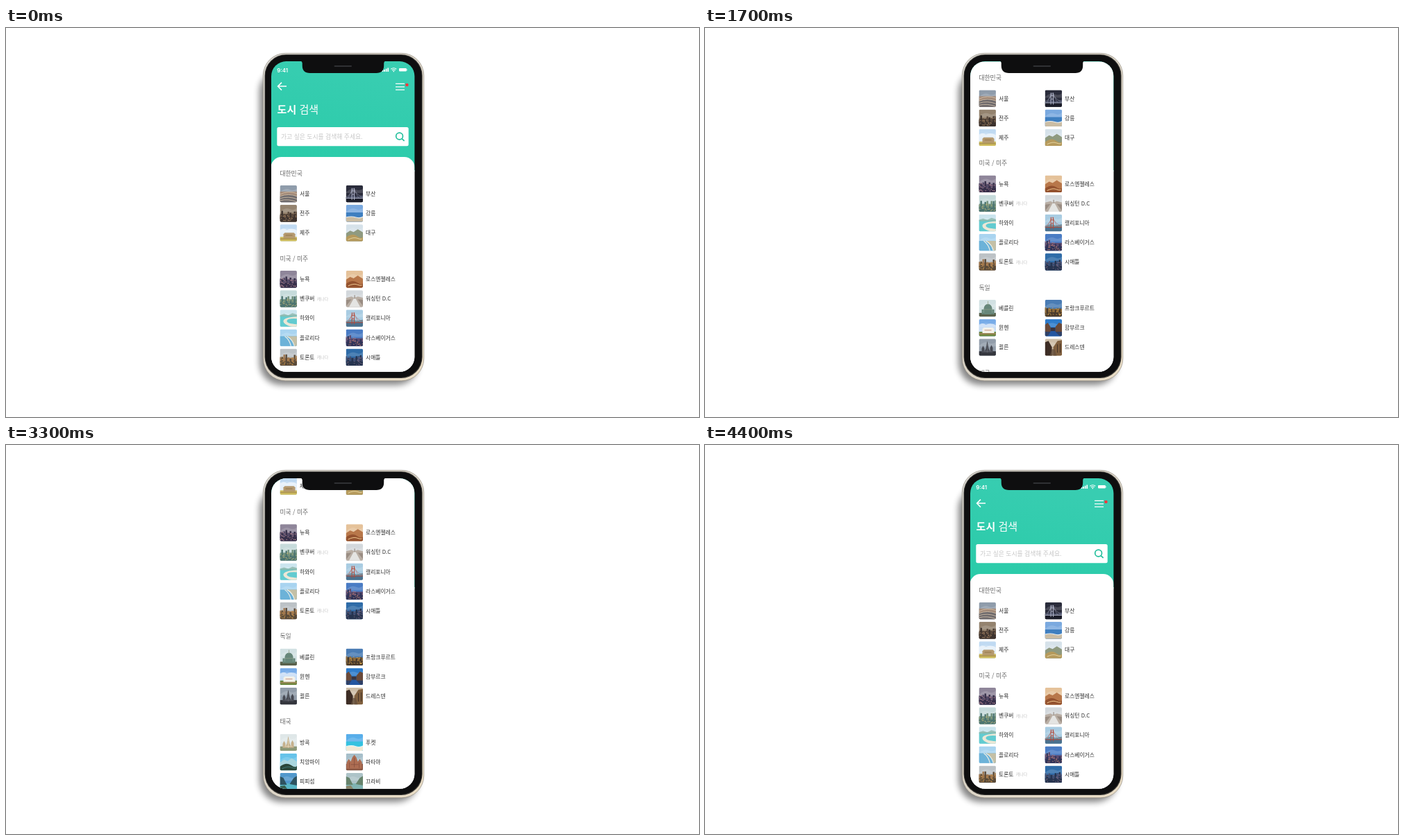
An HTML page for the animation above (6.4 s loop, 998x561 px).

```html
<!DOCTYPE html>
<html lang="ko">
<head>
<meta charset="utf-8">
<title>도시 검색</title>
<style>
html, body { margin: 0; width: 100%; height: 100%; overflow: hidden; background: #fff; }
svg { display: block; width: 100vw; height: 100vh; }
text { font-family: "Noto Sans CJK KR", "Noto Sans KR", "Noto Sans CJK", "Noto Sans", sans-serif; }
.head { font-size: 8.8px; fill: #666; }
.city { font-size: 7.75px; fill: #2b2b2b; }
.tag { font-size: 6px; fill: #c4c4c4; }
</style>
</head>
<body>
<svg viewBox="0 0 998 561" xmlns="http://www.w3.org/2000/svg">
  <defs>
    <linearGradient id="green" x1="0.3" y1="0" x2="0" y2="1">
      <stop offset="0" stop-color="#38cdb1"/>
      <stop offset="1" stop-color="#28cba8"/>
    </linearGradient>
    <linearGradient id="metal" x1="0" y1="0" x2="1" y2="1">
      <stop offset="0" stop-color="#d8d6d0"/>
      <stop offset="0.3" stop-color="#c9c4ba"/>
      <stop offset="0.6" stop-color="#e4dccd"/>
      <stop offset="1" stop-color="#e9dcc4"/>
    </linearGradient>
    <filter id="blur" x="-20%" y="-20%" width="140%" height="140%"><feGaussianBlur stdDeviation="5"/></filter>
    <clipPath id="screen"><rect x="382" y="48" width="206.4" height="447.8" rx="21.5"/></clipPath>
    <clipPath id="tile"><rect width="24.4" height="24.4" rx="1.8"/></clipPath>
  </defs>

  <rect width="998" height="561" fill="#fff"/>
  <rect x="365" y="60" width="229" height="455" rx="32" fill="#000" opacity="0.48" filter="url(#blur)"/>
  <rect x="370.3" y="36.4" width="231.5" height="472.4" rx="32" fill="url(#metal)" stroke="#8b857a" stroke-width="0.6"/>
  <rect x="372.6" y="38.2" width="227" height="466.8" rx="30.5" fill="#3a3936"/>
  <rect x="373.4" y="38.9" width="225.2" height="465" rx="30" fill="#0e0e0f"/>

  <g clip-path="url(#screen)">
    <rect x="381" y="47" width="208" height="160" fill="url(#green)"/>
    <rect x="381" y="205" width="208" height="292" fill="#fff"/>
    <text x="390.3" y="64" style="font:600 7.9px Inter, sans-serif" fill="#fff">9:41</text>
    <g fill="#fff">
      <path d="M541.6 61h1.7v2h-1.7zM544.2 60h1.7v3h-1.7zM546.8 58.7h1.7v4.3h-1.7zM549.4 57.5h1.7v5.5h-1.7z"/>
      <rect x="566" y="58" width="10.8" height="4.6" rx="1.1"/>
      <rect x="577.3" y="59.4" width="0.7" height="1.8" rx="0.3"/>
      <circle cx="558.3" cy="62.4" r="0.9"/>
    </g>
    <g fill="none" stroke="#fff">
      <path d="M554.4 59.3q3.9-3.1 7.8 0M556 61q2.3-1.9 4.6 0" stroke-width="1.1"/>
      <path d="M404 84.1H391.6M397 78.6l-5.5 5.5l5.5 5.5" stroke-width="1.5"/>
      <path d="M561 80.4h13M561 84.8h13M561 89.2h13" stroke-width="1.2"/>
    </g>
    <circle cx="577.4" cy="82" r="2.3" fill="#f8363c"/>
    <text x="390.6" y="122.6" font-size="15" fill="#fff"><tspan font-weight="700">도시</tspan> 검색</text>
    <rect x="390.3" y="143" width="189.4" height="27.3" rx="2.5" fill="#fff"/>
    <text x="396" y="160" font-size="8.8" fill="#c6c6c6">가고 싶은 도시를 검색해 주세요.</text>
    <g fill="none" stroke="#22bf9c" stroke-width="1.7">
      <circle cx="566.6" cy="156" r="4.9"/><path d="M570.2 159.6l3.4 3.2"/>
    </g>
    <g id="sheet"></g>
  </g>

  <path d="M424 47.5q2.5 .3 2.7 3v3.500q0 11 11 11h95.500q11 0 11-11v-3.500q.2-2.700 2.700-3z" fill="#0e0e0f"/>
  <rect x="472.5" y="54" width="25.5" height="2" rx="1" fill="#303134"/>
</svg>

<script>
const sheet = document.getElementById('sheet');

let seed = 7;
const rnd = () => (seed = (seed * 16807) % 2147483647) / 2147483647;
const box = (x, y, w, h, fill, o = 1) =>
  `<rect x="${x}" y="${y}" width="${w}" height="${h}" fill="${fill}" opacity="${o}"/>`;
const shape = (d, fill, o = 1) => `<path d="${d}" fill="${fill}" opacity="${o}"/>`;
const line = (d, color, w = 0.6) => `<path d="${d}" fill="none" stroke="${color}" stroke-width="${w}"/>`;

// Small scenes in a 25 x 25 tile: m = middle tone, g = ground, a = accent
const scenes = {
  road: (m, g, a) => box(0, 9, 25, 16, m) + shape('M0 16q14-6 25 0v9H0z', g) +
    [0, 1, 2, 3].map(i => line(`M0 ${13 + i * 3}q12-${6 - i} 25 ${i - 1}`, a, 0.8)).join(''),
  pool: (m, g, a) => shape('M0 11l8-2 4 2 5-2 8 2v14H0z', m) + shape('M11 12h3l7 13H4z', a) +
    box(12, 7, 1, 5, g) + shape('M0 14l8-1-8 10zM25 14l-8-1 8 10z', g, 0.7),
  bridge: (m, g, a) => box(0, 17, 25, 8, g) + shape('M0 17l8-3 8 2 9-2v4H0z', m) +
    line('M0 18.5H25', a, 1) + line('M8.5 4V21M12 4V21M8.5 8H12M8.5 13H12', a, 1) +
    line('M10 4Q7 14 0 17M11 4Q15 15 25 17M10 5L3 18M11 5L18 18', a, 0.4),
  city: (m, g, a) => {
    let s = box(0, 13, 25, 12, m);
    for (let i = 0; i < 9; i++) {
      const h = 3 + rnd() * 7;
      s += box(i * 3 - 1, 18 - h, 2.4, h + 2, i % 2 ? g : m);
    }
    s += box(0, 18, 25, 7, g);
    for (let i = 0; i < 30; i++) s += box(rnd() * 24, 11 + rnd() * 12, 1.5, 1, a, 0.75);
    return s;
  },
  beach: (m, g, a) => box(0, 11, 25, 14, m) + shape('M0 18q8-2 14 0t11-1v8H0z', g) +
    line('M0 18q8-2 14 0t11-1', a, 1.1),
  bay: (m, g, a) => box(0, 8, 25, 17, m) + shape('M0 8l6-2 6 2 6-3 7 2v3H0z', g, 0.8) +
    shape('M25 10Q6 11 5 16t13 9h7v-4Q9 20 10 16t15-3z', a),
  coast: (m, g, a) => box(0, 10, 25, 15, g) + shape('M10 10h15v15h-4Q19 15 10 10z', m) +
    line('M10 10Q19 15 21 25M7 10Q14 15 16 25', a, 1.2),
  house: (m, g, a) => shape('M0 8q5-4 10 0q7-4 15 1v10H0z', '#fff', 0.6) + box(0, 18, 25, 7, g) +
    shape('M5 14l2-2h13l2 2v6H5z', m) + box(8, 15, 10, 1.5, a, 0.6) + box(0, 20, 25, 2, a, 0.5),
  hill: (m, g, a) => shape('M0 13l6-4 5 2 6-4 8 5v13H0z', m) + shape('M0 19q9-7 16-2t9 0v8H0z', g) +
    line('M3 22q8-4 13-2t7 1', a, 1),
  dome: (m, g, a) => box(0, 19, 25, 6, g) + shape('M7 13a6 7 0 0 1 12 0v8H7z', m) +
    box(12.6, 2, 0.8, 5, a) + box(4, 14, 3, 7, m) + box(19, 14, 3, 7, m) + line('M7 14H19', a),
  spire: (m, g, a) => box(0, 18, 25, 7, g) +
    shape('M4 20V14l2-4 2 4v4l2-4 2-11 2 11 2 4v-5l2-4 2 4v7z', m) + line('M7 18H18M12 8V20', a),
  temple: (m, g, a) => box(0, 15, 25, 10, g) +
    shape('M1 22v-9l3-5 3 4 2-6 3-4 3 4 2 6 3-4 3 5v9z', m) + line('M5 21V13M12 20V6M19 21V13M7 16H18', a),
  street: (m, g, a) => shape('M0 5l5-2 5 9v13H0z', g) + shape('M25 2l-7 1-6 9v13h13z', m) +
    shape('M10 15h4l3 10H7z', a, 0.8) + line('M18 8V20M22 7V20', g, 0.9),
  canal: (m, g, a) => box(0, 17, 25, 8, a) + shape('M0 8l4-3 4 6v7H0zM25 7l-5-2-5 6v7h10z', m) +
    box(8, 12, 7, 5, g) + shape('M0 18h8l-4 6H0zM25 18H15l6 6h4z', g, 0.6),
  cliff: (m, g, a) => box(0, 15, 25, 10, a) + shape('M0 5l5 2 5 10H0zM25 4l-5 3-6 9 11 2z', m) +
    shape('M0 19l7-1 5 7H0z', g)
};

function photo(x, y, spec) {
  const [kind, sky, m, g, a] = spec.split(' ');
  return `<g transform="translate(${x} ${y})"><g clip-path="url(#tile)">${box(0, 0, 25, 25, sky)}` +
    shape('M0 10Q8 3 14 6T25 4v7H0z', '#fff', 0.15) + scenes[kind](m, g, a) + '</g></g>';
}

// Each city: name, scene with its tones, optional tag
const groups = [
  ['대한민국', [
    ['서울', 'road #8f9cab #a38a78 #6e6a6c #d8c6ae'], ['부산', 'bridge #2a2c3b #454a60 #1b1d29 #b3b8ce'],
    ['전주', 'city #94836f #5b4a3d #3d332e #b08c68'], ['강릉', 'beach #7aa9df #3f7fc0 #cbbda4 #e8eef0'],
    ['제주', 'house #c0daf2 #b59a70 #d2c060 #8d7044'], ['대구', 'hill #d6e2ea #8f9a80 #b69a5c #e3d3a0']]],
  ['미국 / 미주', [
    ['뉴욕', 'city #8f869a #544a66 #37304a #dba3a8'], ['로스엔젤레스', 'hill #e5c29a #b8774a #94522f #f0c890'],
    ['벤쿠버', 'city #c6dbdb #71907c #4c7470 #c9ba7c', '캐나다'], ['워싱턴 D.C', 'pool #d3d8dc #b9aea4 #8d7f76 #e4e4e2'],
    ['하와이', 'bay #cbe5ee #62cbd0 #8fb8ac #ece7d6'], ['캘리포니아', 'bridge #a9cce2 #7195a6 #4a718e #b34a3a'],
    ['플로리다', 'coast #a9d4f0 #c4c0a6 #6cb2d8 #eef0e8'], ['라스베이거스', 'city #4a7cc4 #5d4c70 #303458 #dc8f78'],
    ['토론토', 'city #bcc2c6 #a07850 #5a4b3a #dda050', '캐나다'], ['시애틀', 'city #2f6ca8 #3a4d72 #26344f #8a7088']]],
  ['독일', [
    ['베를린', 'dome #d2e1e3 #67877a #59614c #9aa890'], ['프랑크푸르트', 'city #4a7cb4 #8d6a3a #4a3b2c #e2aa4c'],
    ['뮌헨', 'house #78ace8 #f4f2ea #6c873d #c2826c'], ['함부르크', 'canal #2e7ccc #6a4a3a #3a3440 #2456a0'],
    ['쾰른', 'spire #929daa #474a53 #34363d #6c7078'], ['드레스덴', 'street #cdbea8 #80603f #3d2d25 #66503e']]],
  ['태국', [
    ['방콕', 'spire #dfe7e8 #c5b08c #8c9878 #efe4cc'], ['푸켓', 'beach #58aeea #35c2e0 #f1e9d6 #e5f6f6'],
    ['치앙마이', 'hill #66c3ea #a9d6de #2a4638 #3f7a78'], ['파타야', 'temple #a6bfca #ad6d52 #8a5744 #7a4636'],
    ['피피섬', 'cliff #5198cc #2e5360 #38604e #58b6c6'], ['끄라비', 'cliff #adc3c8 #66836c #8a8468 #80b3b2']]]
];

const pitch = 28.15;
let html = '<rect x="381.5" y="186" width="207" height="760" rx="15" fill="#fff"/>';
let y = 209.2;
for (const [title, cities] of groups) {
  html += `<text class="head" x="394.4" y="${y + 3.3}">${title}</text>`;
  cities.forEach(([name, spec, tag], i) => {
    const x = 394.5 + (i % 2) * 95.1;
    const cy = y + 30 + Math.floor(i / 2) * pitch;
    html += photo(x, cy - 12.3, spec) + `<text class="city" x="${x + 28.5}" y="${cy + 2.8}">${name}</text>`;
    if (tag) html += `<text class="tag" x="${x + 53.2}" y="${cy + 2.3}">${tag}</text>`;
  });
  y += 66.8 + (cities.length / 2 - 1) * pitch;
}
sheet.innerHTML = html;

// Scroll distance over 100 ms ticks
const loop = 6400, tick = 100;
const keys = [[0, 0], [9, 0], [17, 137.5], [23, 255.5], [32, 255.5], [38, 137.5], [44, 0], [64, 0]];

function scrollAt(ms) {
  const k = Math.floor((ms % loop) / tick);
  const i = keys.findIndex(p => p[0] > k);
  const [k0, s0] = keys[i - 1], [k1, s1] = keys[i];
  return s0 + (s1 - s0) * (k - k0) / (k1 - k0);
}

const start = performance.now();
function draw() {
  sheet.setAttribute('transform', `translate(0 ${-scrollAt(performance.now() - start)})`);
  requestAnimationFrame(draw);
}
draw();
</script>
</body>
</html>
```
